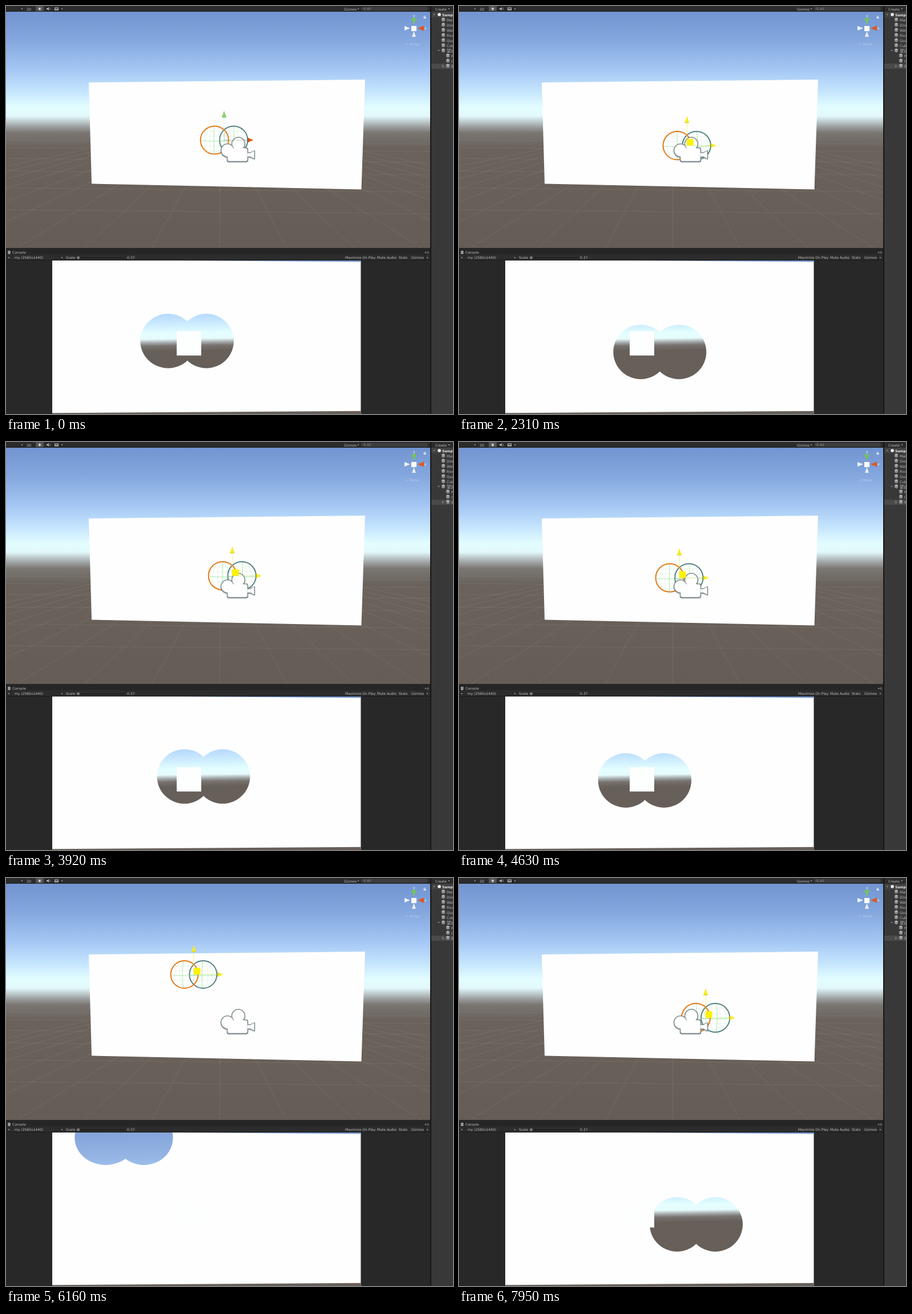
Animation, 783 px wide and 715 px high, one loop 8 s. Source, as an HTML page with a canvas:

```html
<!DOCTYPE html>
<html lang="en">
<head>
<meta charset="utf-8">
<title>Scene view</title>
<style>
html, body { margin: 0; width: 100%; height: 100%; overflow: hidden; background: #282828; }
canvas { display: block; }
</style>
</head>
<body>
<canvas id="stage" width="783" height="715"></canvas>
<script>
const W = 783, H = 715, LOOP = 8000, DRAG_START = 1170, STEP = 64;
const view = document.getElementById('stage').getContext('2d');
const backdrop = document.createElement('canvas');
backdrop.width = W;
backdrop.height = H;
let c = backdrop.getContext('2d');

// Drag path of the handle: step, x, y
const path = [
  [0, 382, 235], [2, 371, 240], [5, 348, 238], [8, 356, 220], [10, 372, 213],
  [12, 388, 217], [14, 405, 226], [16, 410, 238], [19, 392, 246], [22, 368, 241],
  [25, 362, 232], [28, 370, 229], [32, 385, 239], [35, 393, 244], [38, 395, 235],
  [41, 397, 229], [45, 394, 241], [48, 385, 241], [51, 383, 236], [54, 386, 238],
  [58, 405, 233], [61, 437, 224], [64, 478, 211], [66, 507, 185], [68, 505, 168],
  [70, 470, 167], [73, 425, 168], [75, 385, 166], [77, 349, 166], [80, 292, 178],
  [83, 268, 194], [86, 272, 216], [90, 303, 228], [96, 336, 233], [103, 405, 239],
  [106, 432, 245]
];

function pathAt(n) {
  const last = path.length - 1;
  if (n >= path[last][0]) return path[last].slice(1);
  let i = 0;
  while (path[i + 1][0] <= n) i++;
  const a = path[i], b = path[i + 1], d = b[0] - a[0], u = (n - a[0]) / d;
  const slope = (j, k) => {
    const p = path[Math.max(0, j - 1)], q = path[Math.min(last, j + 1)];
    return (q[k] - p[k]) / (q[0] - p[0]) * d;
  };
  return [1, 2].map(k =>
    (2 * u ** 3 - 3 * u * u + 1) * a[k] + (u ** 3 - 2 * u * u + u) * slope(i, k) +
    (3 * u * u - 2 * u ** 3) * b[k] + (u ** 3 - u * u) * slope(i + 1, k));
}

function rect(x, y, w, h, fill) {
  c.fillStyle = fill;
  c.fillRect(x, y, w, h);
}

function poly(points, fill) {
  c.beginPath();
  points.forEach(([x, y]) => c.lineTo(x, y));
  c.closePath();
  c.fillStyle = fill;
  c.fill();
}

function line(x1, y1, x2, y2, color, width = 1) {
  c.beginPath();
  c.moveTo(x1, y1);
  c.lineTo(x2, y2);
  c.strokeStyle = color;
  c.lineWidth = width;
  c.stroke();
}

function arc(x, y, rx, ry, color, width = 1, from = 0, to = Math.PI * 2) {
  c.beginPath();
  c.ellipse(x, y, rx, ry, 0, from, to);
  c.strokeStyle = color;
  c.lineWidth = width;
  c.stroke();
}

function disc(x, y, r, fill) {
  c.beginPath();
  c.arc(x, y, r, 0, Math.PI * 2);
  c.fillStyle = fill;
  c.fill();
}

function text(s, x, y, color = '#c0c0c0', weight = '') {
  c.font = weight + ' 6px "DejaVu Sans", sans-serif';
  c.fillStyle = color;
  c.fillText(s, x, y);
}

function caret(x, y, color = '#999') {
  poly([[x - 1.5, y - 1], [x + 1.5, y - 1], [x, y + 1.5]], color);
}

function gradient(x1, y1, x2, y2, stops) {
  const g = c.createLinearGradient(x1, y1, x2, y2);
  stops.forEach(([y, color]) => g.addColorStop((y - y1) / (y2 - y1), color));
  return g;
}

function drawScene() {
  rect(0, 10, 743, 414, gradient(0, 10, 0, 424, [
    [10, '#7295d1'], [60, '#84a7de'], [110, '#a3c6f4'], [150, '#c5e5fd'],
    [178, '#e3fdff'], [193, '#e2f8fa'], [210, '#a2a7a8'], [222, '#7a7672'],
    [250, '#6a625b'], [424, '#645c55']
  ]));
  c.save();
  c.beginPath();
  c.rect(0, 228, 743, 196);
  c.clip();
  for (let i = -9; i <= 9; i++) line(375 + i * 12, 225, 374 + i * 118, 424, 'rgba(200,200,195,.12)');
  for (const y of [238, 251, 270, 292, 322, 360]) line(0, y - 3, 743, y + 4, 'rgba(200,200,195,.1)');
  c.restore();
  poly([[145, 134], [629, 129], [622.5, 321.5], [150, 311.5]], '#fefefe');

  // Orientation compass
  poly([[710.5, 21], [718.5, 21], [714.5, 33]], '#72c552');
  poly([[721, 39], [732, 34.5], [732, 43.5]], '#e2561d');
  poly([[708, 39], [698, 35], [698, 43]], '#f0f3f6');
  poly([[714.5, 44], [711, 54], [718, 54]], '#e8eef4');
  rect(710, 35, 9, 9, '#fbfbfb');
  text('y', 713, 19, '#fff');
  text('x', 733, 41, '#fff');
  rect(731.5, 19, 4, 3, '#dbe3ef');
  arc(733.5, 19, 1.3, 1.8, '#dbe3ef', .8, Math.PI, 0);
  text('< Persp', 700, 69, 'rgba(255,255,255,.4)');
}

function drawToolbars() {
  rect(0, 0, 743, 10, '#2b2b2b');
  rect(0, 9, 743, 1, '#1d1d1d');
  rect(52, 0, 14, 9, '#505050');
  caret(28, 5);
  text('2D', 36, 7.5);
  disc(59, 5, 1.7, '#eee');
  for (let i = 0; i < 8; i++) {
    const a = i * Math.PI / 4, x = Math.cos(a), y = Math.sin(a);
    line(59 + x * 2.3, 5 + y * 2.3, 59 + x * 3.5, 5 + y * 3.5, '#ddd', .7);
  }
  poly([[71, 4], [73, 4], [75, 2], [75, 8], [73, 6], [71, 6]], '#bbb');
  arc(75.5, 5, 2, 2.5, '#bbb', .7, -1, 1);
  rect(85, 2.5, 7, 5, '#b5b5b5');
  rect(86, 3.5, 5, 2, '#444');
  line(94.5, 1, 94.5, 9, '#1c1c1c');
  caret(98, 5);
  text('Gizmos', 592, 7.5);
  caret(617, 5);
  c.beginPath();
  c.roundRect(622, 1.5, 117, 7, 3.5);
  c.fillStyle = '#3d3d3d';
  c.fill();
  arc(627.5, 4.5, 1.4, 1.4, '#8c8c8c', .7);
  line(628.5, 5.5, 630, 7, '#8c8c8c', .7);
  text('All', 632, 7.2, '#8c8c8c');

  rect(0, 424, 743, 11, '#262626');
  rect(0, 435, 743, 11, '#2c2c2c');
  rect(0, 445, 743, 1, '#1b1b1b');
  rect(3.5, 429, 4, 5.5, '#c0c0c0');
  rect(5, 430, 1, 2.5, '#333');
  text('Console', 11, 433.5);
  caret(735, 432);
  line(737, 431, 741, 431, '#999', .8);
  line(737, 433, 741, 433, '#999', .8);
  caret(5, 441);
  text('my (2560x1440)', 15, 443);
  caret(98, 441);
  text('Scale', 105, 443);
  line(124, 441.5, 208, 441.5, '#151515');
  disc(126.5, 441, 2.6, '#777');
  text('0.37·', 212, 443);
  text('Maximize On Play', 594, 443);
  text('Mute Audio', 650, 443);
  text('Stats', 688, 443);
  text('Gizmos', 710, 443);
  line(734, 436, 734, 445, '#1c1c1c');
  caret(738, 441);
}

function drawHierarchy() {
  rect(743, 0, 2, H, '#171717');
  rect(745, 0, 38, H, '#383838');
  rect(745, 0, 38, 10, '#2b2b2b');
  text('Create', 752, 7.5);
  caret(776, 5);
  rect(745, 10, 38, 10, '#424242');
  rect(745, 101, 38, 9, '#4a4a4a');
  caret(750, 15);
  disc(759, 15, 2.8, '#f2f2f2');
  text('Sample', 764, 17.5, '#e2e2e2', 'bold');
  const rows = ['Main', 'Direct', 'Wall', 'River', 'Quad', 'Cube', '望远', 'P', 'C', 'S'];
  rows.forEach((name, i) => {
    const x = i > 6 ? 774 : 766, y = 24 + i * 9;
    poly([[x - 3, y - 2], [x, y - 3.5], [x + 3, y - 2], [x + 3, y + 2], [x, y + 3.5], [x - 3, y + 2]], '#8d8d8d');
    poly([[x - 3, y - 2], [x, y - 3.5], [x + 3, y - 2], [x, y - .5]], '#bdbdbd');
    if (i === 6) {
      c.font = '7px "Noto Sans CJK SC", "Noto Sans CJK", sans-serif';
      c.fillStyle = '#bbb';
      c.fillText(name, x + 6, y + 2.5);
    } else text(name, x + 6, y + 2.5, '#bbb');
  });
  caret(758, 78);
  poly([[764, 103], [768, 105.5], [764, 108]], '#777');
}

function drawGameBase() {
  rect(0, 446, 743, 269, '#282828');
  rect(81, 446, 540.5, 269, '#fefefe');
  poly([[300, 446], [621.5, 446], [621.5, 448.6]], '#7f9fd6');
  poly([[81, 713.2], [621.5, 709.8], [621.5, 715], [81, 715]], '#675f58');
}

function drawHoles(gx, gy) {
  const d = gx - 382, cx = 317.5 + 2.01 * d - .001 * d * d, cy = 587 + (gy - 235) * 2;
  c.save();
  c.beginPath();
  c.rect(81, 446, 540.5, 267);
  c.clip();
  c.beginPath();
  for (const x of [cx - 33.5, cx + 33.5]) {
    const rx = 48 + Math.max(0, 300 - x) * .05;
    c.moveTo(x + rx, cy);
    c.ellipse(x, cy, rx, 47.7, 0, 0, Math.PI * 2);
  }
  c.clip();
  // The horizon leans slightly
  c.transform(1, -.015, 0, 1, 0, 4.8);
  rect(60, 430, 590, 310, gradient(0, 430, 0, 740, [
    [430, '#7e9fd6'], [490, '#96b6e6'], [537, '#b3d6fd'], [560, '#d0effe'],
    [573, '#e4feff'], [583, '#e6fbfc'], [589, '#a9afb0'], [595, '#77736f'],
    [604, '#675f59'], [740, '#665e57']
  ]));
  c.restore();
  rect(299, 570, 43, 42.5, '#fdfefe');
}

function drawSphere(x, y, r, color) {
  const PI = Math.PI, mesh = 'rgba(120,190,130,.2)', wire = 'rgba(130,220,130,.65)';
  for (const k of [.35, .7]) {
    arc(x, y, r * k, r, mesh, .7);
    const w = r * Math.sqrt(1 - k * k);
    arc(x, y - r * k, w, 2, mesh, .7, 0, PI);
    arc(x, y + r * k, w, 2, mesh, .7, 0, PI);
  }
  const lean = (x - 385) * .05;
  arc(x, y, Math.abs(lean), r, wire, 1, lean > 0 ? -PI / 2 : PI / 2, lean > 0 ? PI / 2 : PI * 1.5);
  arc(x, y, r, 2, wire, 1, 0, PI);
  arc(x, y, r, r, color, 2);
}

function cameraShape(grow) {
  c.beginPath();
  c.arc(388, 253, 11 + grow, 0, Math.PI * 2);
  c.moveTo(418 + grow, 241.5);
  c.arc(407, 241.5, 11 + grow, 0, Math.PI * 2);
  c.roundRect(388 - grow, 249 - grow, 35 + 2 * grow, 23 + 2 * grow, 3);
  c.moveTo(423, 257.5 - grow);
  c.lineTo(428, 257.5 - grow);
  c.lineTo(435 + grow, 253.5 - grow);
  c.lineTo(435 + grow, 267.5 + grow);
  c.lineTo(428, 264 + grow);
  c.lineTo(423, 264 + grow);
}

function drawCamera() {
  c.save();
  c.shadowColor = 'rgba(50,70,75,.6)';
  c.shadowBlur = 2;
  c.shadowOffsetY = 1;
  cameraShape(.9);
  c.fillStyle = '#748184';
  c.fill();
  c.restore();
  cameraShape(-.3);
  c.fillStyle = '#fff';
  c.fill();
}

function drawHandle(x, y, drag, hover) {
  const yellow = '#f6ec1e';
  const up = drag || hover ? yellow : '#8cd06a';
  line(x, y, x, y - 40, drag || hover ? 'rgba(240,230,60,.6)' : 'rgba(150,210,140,.3)');
  line(x, y, x + 42, y, drag ? 'rgba(170,225,90,.55)' : 'rgba(130,150,145,.5)');
  poly([[x - 4, y - 40], [x, y - 51.5], [x + 4, y - 40]], up);
  line(x - 4, y - 40, x + 4, y - 40, drag || hover ? '#c9bd22' : '#6dab55', .8);
  poly([[x + 42, y - 4], [x + 51.5, y], [x + 42, y + 4]], drag ? yellow : '#e75a18');
  line(x + 42, y - 3.5, x + 42, y + 3.5, drag ? '#a9a021' : '#7a3318', 1);
  if (drag) rect(x, y - 11.5, 11.5, 11.5, '#fdf200');
  else {
    c.strokeStyle = 'rgba(120,140,160,.2)';
    c.lineWidth = 1;
    c.strokeRect(x + .5, y - 11.5, 11, 11);
  }
}

function render(ms) {
  const drag = ms >= DRAG_START;
  const n = drag ? Math.floor((ms - DRAG_START) / STEP + .35) : 0;
  const [x, y] = pathAt(n);
  c.drawImage(backdrop, 0, 0);
  const r = 24.5 + (x - 300) * .011;
  drawSphere(x + r * .66, y, r - .8, '#578384');
  drawSphere(x - r * .66, y, r - .8, '#e27a18');
  drawCamera();
  drawHandle(x, y, drag, ms >= 720 && ms < 850);
  drawHoles(x, y);
}

drawScene();
drawToolbars();
drawGameBase();
drawHierarchy();
c = view;

const start = performance.now();
function tick() {
  render((performance.now() - start) % LOOP);
  requestAnimationFrame(tick);
}
tick();
</script>
</body>
</html>
```
